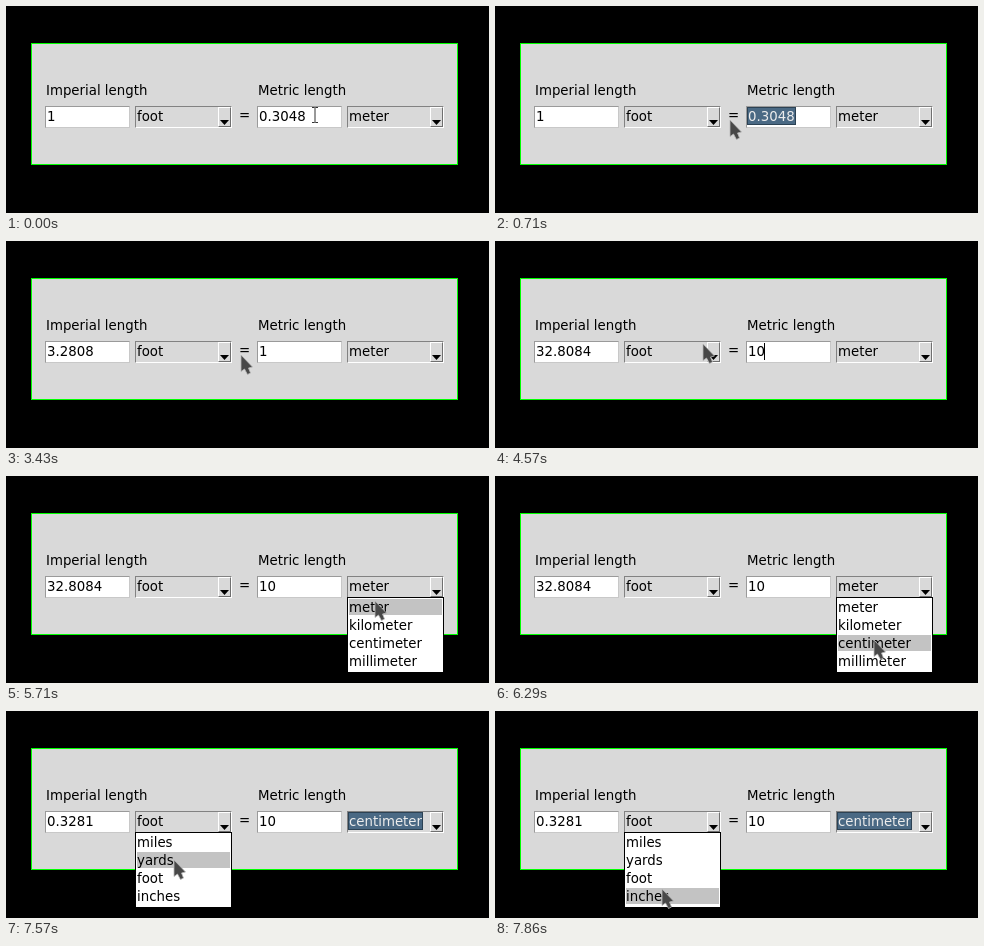
Write an HTML page that moves like this. It is 483x207 px and loops after 8000 ms.

```html
<!DOCTYPE html>
<html lang="en">
<head>
<meta charset="utf-8">
<title>Length converter</title>
<style>
html, body { margin: 0; width: 100%; height: 100%; overflow: hidden; background: #000; }
#stage { position: relative; width: 483px; height: 207px; overflow: hidden; background: #000; }
#stage div, #stage svg { position: absolute; box-sizing: border-box; }
#stage { font: 13.333px/15px "DejaVu Sans", sans-serif; color: #000; white-space: pre; }
.panel { background: #d9d9d9; border: 1px solid #0f0; }
.combo { border: 1px solid; border-color: #828282 #fff #fff #828282; }
.entry { background: #fff; border: 1px solid; border-color: #9a9a9a #c8c8c8 #c8c8c8 #9a9a9a; }
.button { background: #d9d9d9; border: 1px solid; border-color: #fff #6f6f6f #6f6f6f #fff; }
.list { background: #fff; border: 1px solid #000; }
.row { background: #c3c3c3; }
.caret { background: #000; }
.sel { background: #4a6984; color: #ececec; padding: 2px 1px 1px; margin: 0 -1px; box-shadow: inset 0 0 0 1px #2c4254; }
</style>
</head>
<body>
<div id="stage"></div>
<script>
const stage = document.getElementById('stage');
const LOOP = 8000, STEPS_PER_MS = 7 / 1000, LAST_STEP = 55;
const IMPERIAL = ['miles', 'yards', 'foot', 'inches'];
const METRIC = ['meter', 'kilometer', 'centimeter', 'millimeter'];
const METERS_PER_FOOT = 0.3048;

// Steps at which the user acts
const LEAVE_ENTRY = 3, SELECT_ALL = 5, TYPE_ONE = 15, TYPE_ZERO = 27;
const OPEN_METRIC = 38, PICK_METRIC = 46, OPEN_IMPERIAL = 51;

// Pointer moves; lift bends the path upwards
const HOME = { x: 309, y: 109 };
const MOVES = [
  { from: 0, to: LEAVE_ENTRY, x: 237, y: 110 },
  { from: 4, to: SELECT_ALL, x: 235, y: 113 },
  { from: 29, to: 32, x: 208, y: 102 },
  { from: 33, to: 37, x: 366, y: 113, lift: 22 },
  { from: OPEN_METRIC, to: 44, x: 379, y: 163 },
  { from: 45, to: 50, x: 168, y: 118 },
  { from: OPEN_IMPERIAL, to: LAST_STEP, x: 167, y: 177 }
];

const ease = f => f < 0.5 ? 2 * f * f : 1 - 2 * (1 - f) ** 2;

function pointer(k) {
  let { x, y } = HOME;
  for (const m of MOVES) {
    const f = ease(Math.min(1, Math.max(0, (k - m.from) / (m.to - m.from))));
    x += (m.x - x) * f;
    y += (m.y - y) * f - (m.lift || 0) * Math.sin(Math.PI * f);
  }
  return [Math.round(x), Math.round(y)];
}

const box = (cls, x, y, w, h) =>
  `<div class="${cls}" style="left:${x}px;top:${y}px;width:${w}px;height:${h}px"></div>`;
const text = (x, y, s) => `<div style="left:${x}px;top:${y}px">${s}</div>`;
const svg = (x, y, w, h, body) =>
  `<svg style="left:${x}px;top:${y}px" width="${w}" height="${h}">${body}</svg>`;
const selected = s => s && `<span class="sel">${s}</span>`;

const entry = (x, s) => box('entry', x, 100, 85, 22) + text(x + 2, 103, s);

const combo = (x, s) => box('combo', x, 100, 97, 22) + text(x + 2, 103, s) +
  box('button', x + 83, 101, 13, 20) +
  svg(x + 85, 114, 9, 5, '<path d="M0 0H9L4.5 5Z"/>');

function list(x, items, current, y) {
  const row = y < 122 ? current : Math.min(3, Math.floor((y - 122) / 18));
  return box('list', x, 121, 97, 76) + box('row', x + 2, 123 + row * 18, 93, 16) +
    items.map((s, i) => text(x + 2, 124 + i * 18, s)).join('');
}

const arrow = (x, y) => svg(x - 1, y, 15, 22,
  '<path d="M1 1V17.5L4.5 15L7.5 20.5L10.5 19L8.5 14L12.5 13Z" fill="#484848" stroke="#b8b8b8" stroke-width=".8"/>');
const ibeam = (x, y) => svg(x - 4, y - 9, 8, 18,
  '<path d="M1 1.5H3.5L4 2L4.5 1.5H7M4 2V16M1 16.5H3.5L4 16L4.5 16.5H7" fill="none" stroke="#333"/>');

function metricText(k) {
  if (k >= TYPE_ONE) return k < TYPE_ZERO ? '1' : '10';
  const s = String(METERS_PER_FOOT);
  const cut = k < SELECT_ALL ? Math.max(4, s.length - k) : 0;
  return s.slice(0, cut) + selected(s.slice(cut));
}

function draw(k) {
  const [x, y] = pointer(k);
  const typing = k >= TYPE_ONE - 1;
  const meters = k < TYPE_ONE ? METERS_PER_FOOT : k < TYPE_ZERO ? 1 : k < PICK_METRIC ? 10 : 0.1;
  const feet = +(meters / METERS_PER_FOOT).toFixed(4);
  const caretOn = typing ? k < OPEN_METRIC - 1 && k % 6 > 1 : k > 6 && k < 11;
  const caretX = 253 + 8 * ((k >= TYPE_ONE) + (k >= TYPE_ZERO));

  stage.innerHTML = box('panel', 25, 37, 427, 122) +
    text(40, 77, 'Imperial length') + text(252, 77, 'Metric length') +
    entry(39, feet) + combo(129, 'foot') + text(233, 102, '=') +
    entry(251, metricText(k)) +
    combo(341, k < PICK_METRIC ? 'meter' : selected('centimeter')) +
    (caretOn ? box('caret', caretX, 102, 1, 17) : '') +
    (k >= OPEN_METRIC && k < PICK_METRIC ? list(341, METRIC, 0, y) : '') +
    (k >= OPEN_IMPERIAL ? list(129, IMPERIAL, 2, y) : '') +
    (k < LEAVE_ENTRY ? ibeam(x, y) : arrow(x, y));
}

const start = performance.now();
let shown = -1;
function tick() {
  const t = (performance.now() - start) % LOOP;
  // The screen refreshes seven times a second
  const k = Math.min(LAST_STEP, Math.floor(t * STEPS_PER_MS + 0.06));
  if (k !== shown) draw(shown = k);
  requestAnimationFrame(tick);
}
tick();
</script>
</body>
</html>
```
